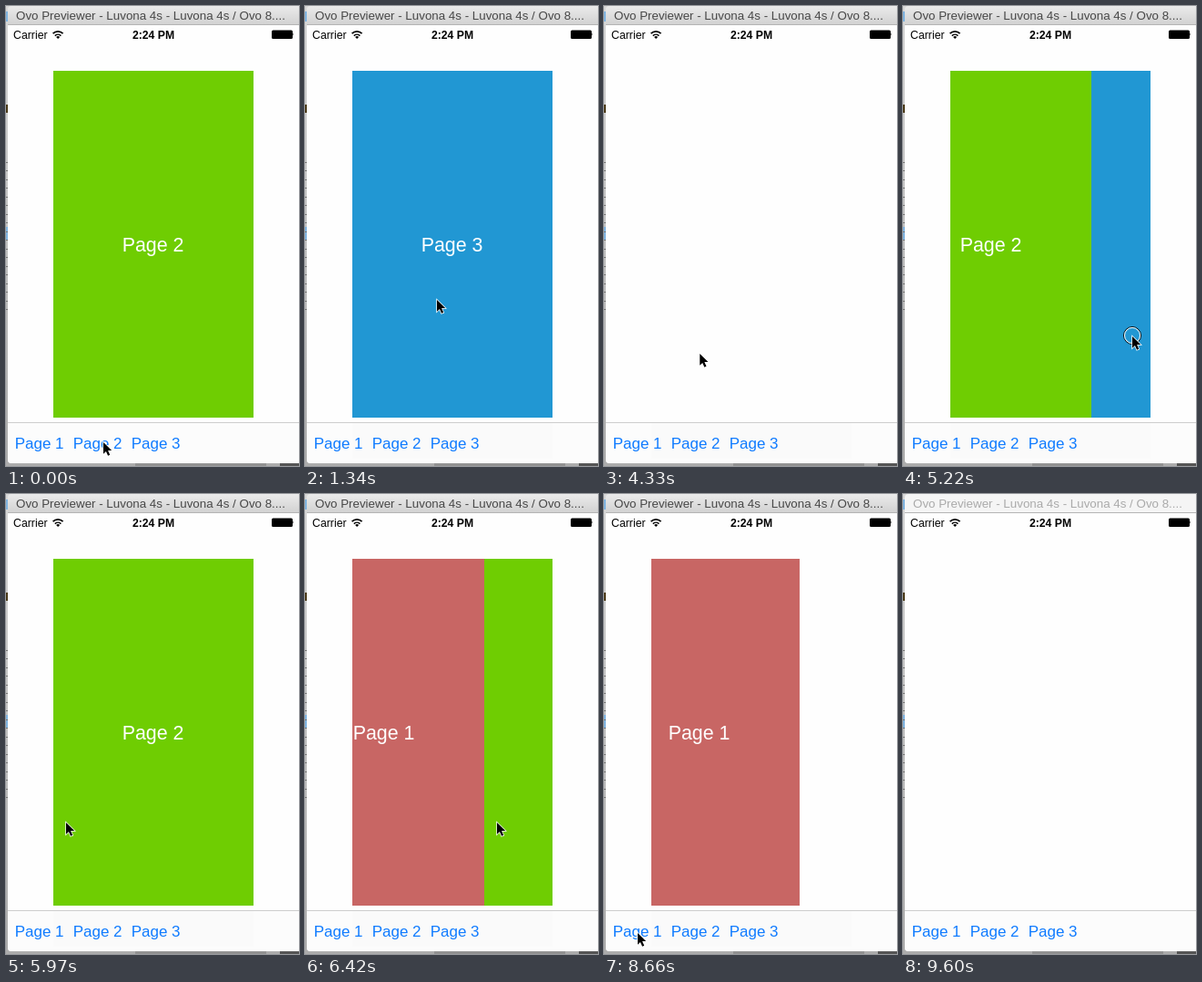
Write an HTML page that moves like this. It is 322 px wide and 504 px high and loops after 9700 ms.

```html
<!DOCTYPE html>
<html lang="en">
<head>
<meta charset="utf-8">
<title>Page swiping</title>
<style>
  html, body { margin: 0; width: 100%; height: 100%; overflow: hidden; }
  svg { display: block; width: 322px; height: 504px; font-family: "Liberation Sans", Arial, sans-serif; }
</style>
</head>
<body>
<svg viewBox="0 0 322 504">
  <defs>
    <linearGradient id="bar" x2="0" y2="1">
      <stop stop-color="#ebebeb"/><stop offset="1" stop-color="#d2d2d2"/>
    </linearGradient>
    <linearGradient id="desk" x2="0" y2="1">
      <stop stop-color="#d8d8d8"/><stop offset="1" stop-color="#acacac"/>
    </linearGradient>
    <clipPath id="view"><rect x="52" y="71" width="220" height="380"/></clipPath>
  </defs>

  <!-- desktop peeking out behind the window -->
  <rect width="322" height="504" fill="url(#desk)"/>
  <path d="M142 500h144v4h-144z" fill="#929292"/>
  <path d="M301 500h21v4h-21z" fill="#555"/>
  <path d="M0 6h2v11h-2zM0 242h2v14h-2z" fill="#80b4e0"/>
  <path d="M0 108h2v9h-2z" fill="#4a3a18"/>
  <path d="M1 171V340" stroke="#777" stroke-width="2" stroke-dasharray="1 8 1 9"/>

  <!-- window -->
  <path d="M2 20H322V501H6q-4 0-4-4z" fill="#fefefe"/>
  <path id="titleBar" d="M2 20V4q0-4 4-4H322V20z"/>
  <path d="M2 20.5H322" stroke="#b4b4b4"/>
  <text id="title" x="11" y="15" font-size="13.35">Ovo Previewer - Luvona 4s - Luvona 4s / Ovo 8....</text>

  <!-- status bar -->
  <text x="8" y="36" font-size="12.3">Carrier</text>
  <path d="M51.6 30.2a7.8 7.8 0 0 1 11 0M53.8 32.6a4.7 4.7 0 0 1 6.6 0" fill="none" stroke="#000" stroke-width="1.7"/>
  <path d="M57.1 36l-2-2.1a2.9 2.9 0 0 1 4 0z"/>
  <text x="162" y="36" font-size="12.2" font-weight="bold" text-anchor="middle">2:24 PM</text>
  <rect x="292" y="26.5" width="23" height="9.5" rx="1.5"/>
  <path d="M315.5 29.5q1.5 1.5 0 3z"/>

  <g clip-path="url(#view)"><g id="pages"></g></g>

  <!-- toolbar -->
  <path d="M2 457H322V501H6q-4 0-4-4z" fill="#fcfcfc"/>
  <rect id="tint" x="52" y="457" width="220" height="39" fill="#fafafa"/>
  <path d="M2 456.5H322" stroke="#cdcdcd"/>
  <g id="buttons" font-size="17" fill="#0f7bff"></g>

  <g id="cursor">
    <g id="ring" fill="none">
      <circle cx="1" r="9.5" stroke="#111"/>
      <circle cx="1" r="8.5" stroke="#fff"/>
    </g>
    <path transform="translate(1 1) scale(.82)" d="M0 0v15.5l3.6-3.4 2.6 5.9 2.6-1.1-2.6-5.8h5z" stroke="#fff" stroke-width="1.8" paint-order="stroke"/>
  </g>
</svg>
<script>
const LOOP = 9700, TICK = 149.4, INACTIVE = 9600, WIDTH = 220;
const $ = id => document.getElementById(id);
const colors = ['#c86664', '#6fcd02', '#2197d3'];

$('pages').innerHTML = colors.map((c, k) => `<g transform="translate(${52 + k * WIDTH} 71)">
  <rect width="${WIDTH}" height="380" fill="${c}"/>
  <text x="109.6" y="198" font-size="21.4" fill="#fff" text-anchor="middle">Page ${k + 1}</text></g>`).join('');
$('buttons').innerHTML = colors.map((c, k) => `<text x="${9.7 + k * 64}" y="485">Page ${k + 1}</text>`).join('');

const show = (id, on) => $(id).style.display = on ? '' : 'none';

// Smooth rise from 0 to 1 over a span of ticks
function ramp(tick, start, span) {
  const u = Math.min(1, Math.max(0, (tick - start) / span));
  return u * u * (3 - 2 * u);
}

function scene(tick) {
  let x = 106, y = 477, held = false, tapped = -1;

  const glide = (start, toX, toY, span = 2) => {
    const u = ramp(tick, start, span);
    x += (toX - x) * u;
    y += (toY - y) * u;
  };
  // A tapped button slides the pages on by one
  const tap = (start, button) => {
    if (tick === start) { held = true; tapped = button; }
    return ramp(tick, start + 1, 3);
  };
  // A drag moves the pages by its distance, then they snap the rest of the way
  const drag = (start, release, distance) => {
    if (tick >= start && tick < release) held = true;
    const part = distance / WIDTH;
    return part * ramp(tick, start, 2) + (1 - part) * ramp(tick, release, 3);
  };

  glide(0, 156, 485);
  glide(6, 144, 321);
  glide(9, 166, 463);
  glide(13, 149, 477);
  glide(26, 96, 362, 4);
  glide(33, 251, 361);
  glide(36, 65, 359, 4);
  glide(41, 210, 359);
  glide(43, 205, 434, 3);
  glide(52, 165, 488, 1);
  glide(53, 36, 480, 3);

  // Past the last page the view is blank; the next drag starts from page 3 again
  let pos = 1 + tap(4, 2) + tap(16, 2);
  if (tick > 32) pos = 2;
  pos += tap(56, 0) - drag(33, 36, 155) - drag(41, 43, 145);
  return { x, y, held, tapped, pos };
}

function draw(now) {
  const t = now % LOOP, active = t < INACTIVE;
  const tick = Math.floor((t + 12) / TICK);
  const { x, y, held, tapped, pos } = scene(tick);

  $('pages').setAttribute('transform', `translate(${-pos * WIDTH} 0)`);
  [...$('pages').children].forEach((page, k) => page.style.display = tick > 52 && k ? 'none' : '');
  [...$('buttons').children].forEach((b, k) => b.style.opacity = tapped === k ? .3 : 1);
  $('cursor').setAttribute('transform', `translate(${x} ${y})`);
  show('cursor', active);
  show('ring', held);
  show('tint', active && tick);
  $('titleBar').setAttribute('fill', active ? 'url(#bar)' : '#f5f5f5');
  $('title').setAttribute('fill', active ? '#484848' : '#aaa');
}

const start = performance.now();
(function frame() {
  draw(performance.now() - start);
  requestAnimationFrame(frame);
})();
</script>
</body>
</html>
```
